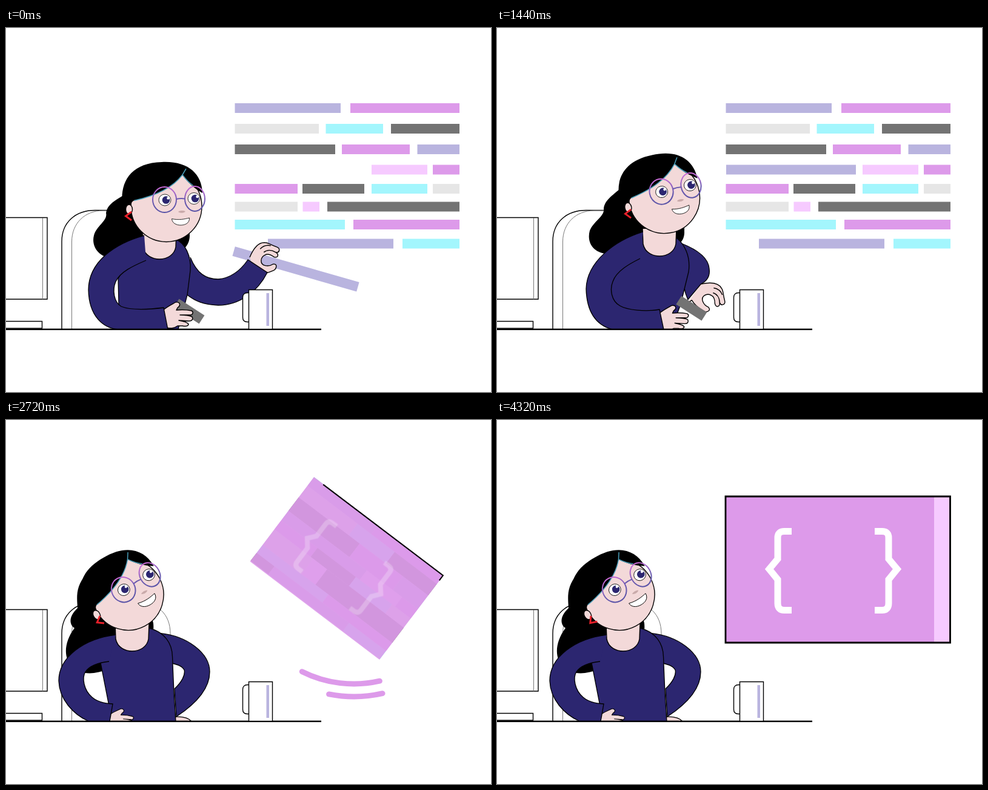
An HTML page that plays this animation: 800x600 px, repeating every 4360 ms.

```html
<!DOCTYPE html>
<html lang="en">
<head>
<meta charset="utf-8">
<title>Code blocks</title>
<style>
html, body { margin: 0; width: 100%; height: 100%; overflow: hidden; background: #fff; }
svg { display: block; width: 800px; height: 600px; }
.line { fill: none; stroke: #000; stroke-width: 1.4; }
.white { fill: #fff; stroke: #000; stroke-width: 1.4; }
.skin { fill: #f3d9d9; stroke: #000; stroke-width: 1.4; stroke-linejoin: round; }
.navy { fill: #2c2670; stroke: #000; stroke-width: 1.3; }
.thin { fill: none; stroke: #777; stroke-width: 1; }
.fine { fill: #fff; stroke: #000; stroke-width: .8; }
.brace { fill: none; stroke: #fff; stroke-width: 11; }
.swoosh { fill: none; stroke: #dd9aea; stroke-width: 9; stroke-linecap: round; }
</style>
</head>
<body>
<svg viewBox="0 0 800 600">
  <defs>
    <linearGradient id="rim" gradientUnits="userSpaceOnUse" x1="0" y1="261" x2="0" y2="304">
      <stop stop-color="#cc6cd8"/><stop offset=".6" stop-color="#6a5ab0"/><stop offset="1" stop-color="#5852a6"/>
    </linearGradient>
    <path id="half" class="brace" d="M486 182.5H474Q463 182.5 463 193V228L449 244.7L463 262V301Q463 312.5 474 312.5H486"/>
    <g id="eye">
      <ellipse class="fine" rx="10" ry="9.5"/>
      <circle cx="2" r="6.3" fill="#2c2670"/><circle cx="5.5" cy="-3" r="2.2" fill="#fff"/>
    </g>
  </defs>

  <path class="white" d="M-5 312.5H68V447H-5zM-5 483.5H59.5V495H-5z"/>
  <path class="thin" d="M60.5 313V447"/>
  <path class="line" d="M92 497V352C92 320 115 300.5 147 300.5H176"/>
  <path class="thin" d="M108.5 497V352C108.5 322 130 301 160 301H220C250 301 271 320 271 352V497"/>

  <g id="panel">
    <g id="bars"></g>
    <g id="cover"><rect x="377" y="124.5" width="371" height="241.5" fill="#dd9aea"/></g>
    <rect id="strip" y="125" height="241" fill="#f6caff"/>
    <g id="braces"><use href="#half"/><use href="#half" transform="translate(1109) scale(-1 1)"/></g>
    <path id="border" d="M404 125H747.5V366H377V125Z" pathLength="100" fill="none" stroke="#000" stroke-width="2.8"/>
  </g>
  <path id="inner" class="swoosh"/><path id="outer" class="swoosh"/>
  <g id="dots" fill="#f6caff"></g>

  <rect id="held" x="-61" y="-8" width="213" height="16" fill="#b9b4df"/>
  <path id="hair"/>
  <g id="hand" class="skin">
    <path d="M0 0C3 -16 9 -28 20 -29C25 -30 30 -27 40 -26C47 -25 47 -17 40 -17C47 -15 46 -8 39 -9C34 -11 28 -13 24 -9C17 -4 18 8 28 8C34 8 38 5 40 3C48 0 47 10 43 13C36 18 28 23 19 24L21 33"/>
    <path class="line" d="M40 -17C32 -20 25 -18 21 -13M30 -26C22 -26 17 -22 14 -17"/>
  </g>
  <g id="flat"><path class="skin" d="M-6 4L4 -7C20 -9 34 -8 40 0"/></g>
  <path id="arm" class="navy"/>
  <path id="torso" class="navy"/>
  <g id="neck"><path class="skin" d="M-28 -45L-27 -20C-24 -5 -10 0 0 0C14 0 25 -8 27 -20L28 -45"/></g>
  <rect id="card" x="-25" y="-8.2" width="50" height="16.4" fill="#737373"/>
  <g id="palm" class="skin">
    <path d="M-3 2C5 -5 12 -8 19 -12C26 -13 28 -7 22 -3L20 1C30 0 40 1 45 2C49 4 47 9 43 9L26 9C34 9 42 10 46 12C48 16 46 19 41 19L24 18C30 19 38 21 40 24C40 28 34 28 30 27L22 27C15 32 10 31 4 30"/>
  </g>
  <path id="sleeve" class="navy"/>

  <g id="head"><g transform="translate(-264.5 -294)">
    <circle class="skin" cx="264.5" cy="294" r="58.5"/>
    <path d="M192 290C188 255 205 222 257 221C300 219 323 240 324 272C310 264 299 254 291 242C276 262 250 276 212 284C206 286 206 292 206 298L196 296Z"/>
    <path fill="none" stroke="#4a9fba" stroke-width="1.5" d="M211 284.5C250 276 276 262 291 242L297 232M291 242C297 250 303 256 309 260"/>
    <ellipse class="skin" cx="203" cy="299" rx="5.5" ry="8"/>
    <g transform="translate(207 303)"><path id="ring" d="M0 0L-9.5 7L0 14" fill="none" stroke="#e8202a" stroke-width="3"/></g>
    <g id="eyes"><use href="#eye" x="262" y="283.5"/><use href="#eye" x="310" y="281"/></g>
    <path fill="#c9aaaa" d="M284 303C287 300.500 293 300.500 296 302.500C293 305.500 287 305.500 284 303"/>
    <path id="mouth" class="fine" d="M273.5 314.5C285 317 295 315 302.500 313C303 322 295 325 288 325C280 325 274 321 273.5 314.5Z"/>
    <g fill="none" stroke="url(#rim)" stroke-width="2">
      <ellipse cx="261.5" cy="283" rx="19.5" ry="21"/><ellipse cx="311.5" cy="281.5" rx="16.5" ry="20.5"/>
      <path d="M281 282Q288 280.500 295 281.5" stroke="#6a5ab0"/>
    </g>
  </g></g>

  <path fill="#fff" d="M0 497H520V525H0z"/>
  <path d="M0 496.8H520" stroke="#000" stroke-width="2.6"/>
  <path class="white" d="M401 436.5H398C393 436.5 390.5 440 390.5 444V477C390.5 482 393 484.5 398 484.5H401M400.5 431.5H439.5V496.5H400.5z"/>
  <path fill="#b9b4df" d="M429.5 437H434V491H429.5z"/>
</svg>

<script>
const LOOP = 4360, STEP = 40, CX = 562.5, CY = 244;
const $ = id => document.getElementById(id);
const set = (el, attrs) => { for (const k in attrs) el.setAttribute(k, attrs[k]); };
const make = (parent, tag, attrs) => {
  const el = document.createElementNS('http://www.w3.org/2000/svg', tag);
  set(el, attrs);
  return parent.appendChild(el);
};
const numbers = s => s.match(/-?[\d.]+/g).map(Number);
const mix = (a, b, p) => a + (b - a) * p;
const ease = p => (1 - Math.cos(Math.PI * p)) / 2;

// Finds the two keys around t and the eased progress between them.
function between(keys, t) {
  const i = keys.findIndex(k => k[0] > t);
  if (i < 0) return [keys.at(-1)[1], keys.at(-1)[1], 0];
  if (i === 0) return [keys[0][1], keys[0][1], 0];
  const [t0, a] = keys[i - 1], [t1, b] = keys[i];
  return [a, b, ease((t - t0) / (t1 - t0))];
}
const track = (t, ...keys) => mix(...between(keys, t));
const blend = (a, b, p) => {
  const nb = numbers(b);
  let i = 0;
  return a.replace(/-?[\d.]+/g, n => mix(+n, nb[i++], p).toFixed(2));
};

// Poses: matching path and transform strings, blended number by number.
const hold = {
  hair: 'M215 260C190 282 168 285 165 305C168 318 150 325 145 342C140 362 155 380 180 380C210 380 240 375 265 375C290 372 303 360 303 342L300 290Z',
  arm: 'M304 378C315 405 330 414 350 414C372 412 388 398 399 382L431 403C415 435 385 457 350 457C325 456 312 450 299 440',
  torso: 'M228 342L185 413L187 497L284 497L299 440L304 400C306 375 295 355 281 349Z',
  sleeve: 'M228 342C180 355 136 385 136 432C137 475 160 495 186 497C210 497 240 497 267 497L260 461C235 464 205 465 190 459C178 452 175 432 181 418C188 402 210 392 231 383',
  head: 'translate(264.5 294) rotate(0)',
  neck: 'translate(253 381)',
  hand: 'translate(402 378) rotate(12)',
  palm: 'translate(261 464) rotate(0) scale(1)',
  flat: 'translate(345 497)'
};
const lean = {
  ...hold,
  hair: 'M225 245C195 275 178 280 176 298C178 310 160 318 153 334C147 356 162 374 188 372C220 370 250 368 278 365C300 362 310 350 309 335L310 280Z',
  arm: 'M304 355C320 362 335 366 350 364C370 361 385 353 397 346L418 379C400 392 375 404 345 405C332 405 325 404 315 402',
  torso: 'M241 336L188 415L190 497L288 497L303 455L316 402C320 375 308 355 296 346Z',
  sleeve: 'M241 336C195 350 148 385 147 430C148 470 165 490 190 497C215 497 245 497 275 497L268 464C245 468 215 465 203 458C188 450 186 430 191 418C197 400 220 388 236 380',
  head: 'translate(276 280) rotate(-10.3)',
  neck: 'translate(268 376)',
  hand: 'translate(397 346) rotate(0)',
  palm: 'translate(270 469) rotate(0) scale(.97)'
};
const reach = {
  ...lean,
  arm: 'M308 352C335 345 360 335 375 310C390 290 400 270 410 249L444 268C432 300 410 345 380 370C360 388 340 398 315 402',
  hand: 'translate(410 249) rotate(-30)'
};
const grab = {
  ...lean,
  arm: 'M304 355C330 365 350 380 350 400C350 415 342 424 330 430L304 455C300 440 300 425 305 415C308 410 312 405 315 402',
  hand: 'translate(330 430) rotate(75)'
};
const rest = {
  ...lean,
  hair: 'M195 255C168 280 165 290 165 303C163 318 150 322 149 342C132 365 125 395 155 398C200 400 245 375 270 362C285 356 288 348 287 338L280 290Z',
  arm: 'M290 372C300 388 312 405 320 420C330 440 345 468 354 489L314 497C305 480 297 465 290 452C287 449 286 448 285 447',
  torso: 'M213 345L173 420L173 497L283 497L287 450L293 395C293 375 285 357 268 349Z',
  sleeve: 'M213 345C180 360 154 400 154 430C155 470 185 489 212 489C240 488 270 470 288 451L263 425C245 437 230 448 212 448C198 447 193 436 195 425C198 410 207 398 217 387',
  head: 'translate(246 291.5) rotate(-7.5)',
  neck: 'translate(240 379)',
  palm: 'translate(266 429) rotate(-33) scale(.95)'
};
const proud = {
  ...rest,
  hair: 'M150 240C112 265 117 290 118 310C102 325 105 338 113 343C85 380 100 422 145 417C190 410 225 380 235 360C243 355 244 345 243 335L230 280Z',
  arm: 'M250 351C300 355 336 385 336 415C336 445 310 470 281 489L278 443C290 432 296 420 294 412C290 405 282 403 274 401',
  torso: 'M181 354L156 400L175 497L280 497L277 450L274.5 390C274 368 262 350 236 343Z',
  sleeve: 'M181 354C130 360 87 390 87 430C88 460 110 485 137 497C150 497 160 497 171 497L176 468C160 467 150 464 142 457C128 445 125 425 131 415C138 405 152 400 170 398',
  head: 'translate(201.5 288) rotate(-28)',
  neck: 'translate(208 381)',
  palm: 'translate(174 484) rotate(5) scale(.78)',
  flat: 'translate(266 497)'
};
const poses = [[0, hold], [440, reach], [600, reach], [1000, lean], [1120, lean], [1320, grab], [1400, grab],
  [1600, lean], [1680, lean], [1860, rest], [1960, rest], [2220, proud]];
const isPath = new Set(['hair', 'arm', 'torso', 'sleeve']);

// Rows: top, seam (where in each gap the packed neighbours meet), then colour letter and edges of each bar.
const colors = { l: '#b9b4df', p: '#dd9aea', g: '#e6e6e6', c: '#a3f6fd', d: '#737373', k: '#f6caff' };
const rows = [
  [124, .5, 'l377.5-552 p568-748'],
  [158, .4, 'g377.5-516 c527.5-622 d635-748'],
  [192, .8, 'd377.5-543 p554-666 l678.5-748'],
  [225.5, .9, 'l378-592 k603-695 p704-748'],
  [257, 0, 'p377.5-481 d489-591 c603-695 g704-748'],
  [286.5, .85, 'g377.5-481 k489.5-517 d530-748'],
  [316, .45, 'c377.5-559 p573-748'],
  [347.5, .2, 'd377-427 l432-639 c654-748']
];
const packed = [124, 149, 182, 221, 248, 274, 318, 341, 364];
const bars = rows.flatMap(([y, seam, text], r) => {
  const cells = text.split(' ').map(c => [c[0], ...c.slice(1).split('-').map(Number)]);
  return cells.map(([color, x0, x1], i) => ({
    el: make($('bars'), 'rect', { fill: colors[color] }),
    from: [x0, y, x1, y + 16],
    to: [i ? mix(cells[i - 1][2], x0, seam) : 377, packed[r],
      cells[i + 1] ? mix(x1, cells[i + 1][1], seam) : 748, packed[r + 1]],
    start: r === 3 && !i ? 440 : r === 7 && !i ? 1600 : 0
  }));
});

const dots = [[745, 31, 2.2, 3.2], [646.5, 132, 3.6, 2.2], [746, 231, 2, 3.4],
  [860, 90, 3, 2], [880, 180, 2, 3], [850, 290, 3, 2]]
  .map(([x, y, rx, ry]) => ({ x, y, rx, ry, el: make($('dots'), 'ellipse', {}) }));

function arc(r, head, length) {
  const at = deg => {
    const a = deg * Math.PI / 180;
    return `${574 + r * Math.cos(a)} ${CY + r * Math.sin(a)}`;
  };
  return length > 0 ? `M${at(head)}A${r} ${r} 0 0 1 ${at(head + length)}` : '';
}

function drawPerson(t) {
  const [a, b, p] = between(poses, t);
  const now = {};
  for (const key in a) {
    now[key] = blend(a[key], b[key], p);
    set($(key), { [isPath.has(key) ? 'd' : 'transform']: now[key] });
  }
  const resting = t >= 1760;
  set($('hand'), { opacity: resting ? 0 : 1 });
  set($('flat'), { opacity: resting ? 1 : 0 });

  const [hx, hy, hr] = numbers(now.hand), turn = hr * Math.PI / 180;
  const gx = hx + 33 * Math.cos(turn), gy = hy + 33 * Math.sin(turn);
  const tilt = track(t, [0, 16], [240, -16], [440, 0]);
  set($('held'), { transform: `translate(${gx} ${gy}) rotate(${tilt})`, opacity: t < 440 ? 1 : 0 });

  const [px, py] = numbers(now.palm);
  const pass = track(t, [1320, 0], [1400, 1]);
  const x = mix(px + 41, gx - 28, pass), y = mix(py + 3, gy + 9.5, pass);
  const angle = track(t, [0, 33], [1080, 36], [1400, 36], [1600, 0]);
  set($('card'), { transform: `translate(${x} ${y}) rotate(${angle})`, opacity: t < 1600 ? 1 : 0 });

  const headTurn = numbers(now.head)[2];
  const swing = track(t, [0, 0], [1080, -12], [1300, 0], [2400, 0], [2720, -30], [3560, -48]);
  set($('ring'), { transform: `rotate(${swing - headTurn})` });
  set($('eyes'), { opacity: t > 2340 && t < 2460 ? 0 : 1 });
  const smile = track(t, [1960, 1], [2400, .94], [2720, 1.1]);
  set($('mouth'), { transform: `translate(288 318) scale(${smile}) translate(-288 -318)` });
}

function drawPanel(t) {
  const pack = track(t, [1840, 0], [2180, 1]);
  for (const { el, from, to, start } of bars) {
    const [x0, y0, x1, y1] = from.map((v, i) => mix(v, to[i], pack));
    set(el, { x: x0, y: y0, width: x1 - x0, height: y1 - y0, opacity: t >= start && t < 2840 ? 1 : 0 });
  }
  const spin = track(t, [2222, 0], [2851, -360]);
  const size = track(t, [2000, 1], [2220, 1.08], [2400, .912], [2720, .722], [2960, 1.03], [3120, 1]);
  const drop = track(t, [3600, 0], [4200, 1]);
  set($('panel'), { transform: `translate(${CX} ${CY + drop}) rotate(${spin}) scale(${size}) translate(${-CX} ${-CY})` });
  set($('cover'), { opacity: track(t, [2530, 0], [2770, 1]) });
  set($('braces'), { opacity: track(t, [2680, 0], [2800, 1]) });
  const drawn = track(t, [2600, 0], [2930, 100]);
  set($('border'), { 'stroke-dasharray': drawn < 100 ? `${drawn} 200` : 'none', opacity: drawn > 0 ? 1 : 0 });
  const strip = track(t, [2800, 0], [3000, 25]);
  set($('strip'), { x: 746 - strip, width: strip });

  const head = spin + track(t, [2400, 18], [2720, 40]);
  const length = track(t, [2360, 0], [2400, 14.5], [2720, 39.5], [2800, 0]);
  set($('inner'), { d: arc(191, head, length) });
  set($('outer'), { d: arc(212, head, length * .61) });
}

function drawDots(t) {
  const u = (t - 2860) / 800;
  set($('dots'), { opacity: u > 0 && u < 1 ? 1 : 0 });
  const out = Math.sin(u * Math.PI / 2), grow = 1 + 1.2 * Math.max(0, .875 - u);
  for (const { el, x, y, rx, ry } of dots)
    set(el, { cx: mix(700, x, out), cy: mix(200, y, out), rx: rx * grow, ry: ry * grow });
}

const begin = performance.now();
function frame() {
  const t = Math.floor((performance.now() - begin) % LOOP / STEP) * STEP;
  drawPerson(t);
  drawPanel(t);
  drawDots(t);
  requestAnimationFrame(frame);
}
frame();
</script>
</body>
</html>
```
